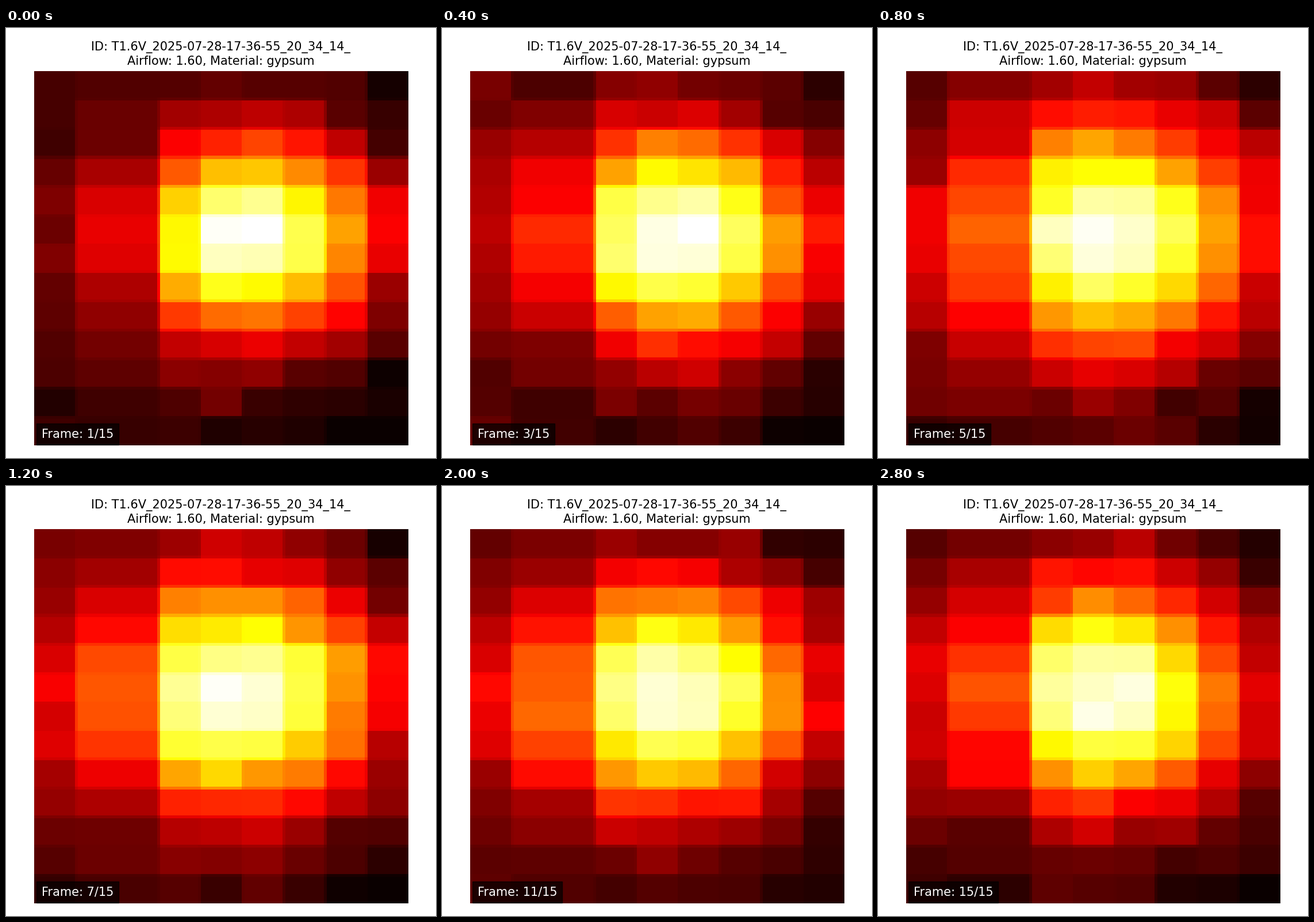
A matplotlib script that plays this animation: 748 px wide and 748 px high, repeating every 3 s.

```python
import numpy as np
import matplotlib.pyplot as plt
from matplotlib.animation import FuncAnimation

SIZE, DPI = 748, 100
FRAMES, STEP = 15, 200
ROWS, COLS, RES = 13, 9, 128
FLICKER = 0.025

plt.rcParams["font.family"] = "DejaVu Sans"
plt.rcParams["font.size"] = 15

noise = np.random.default_rng(7).normal(0, FLICKER, (FRAMES, ROWS, COLS))
row, col = np.mgrid[:ROWS, :COLS]


def area_weights(n):
    """Share of each of n cells in each of RES pixels."""
    p = np.arange(RES)[:, None] * n / RES
    c = np.arange(n)[None, :]
    overlap = np.minimum(p + n / RES, c + 1) - np.maximum(p, c)
    return np.clip(overlap, 0, None) * RES / n


row_weights, col_weights = area_weights(ROWS), area_weights(COLS)


def heat(i):
    """Warm spot that spreads quickly, settles and wanders to the left."""
    spread = np.interp(i, [0, 4, 7, 14], [0.88, 1.06, 1.02, 1.0])
    center = 4.3 + 0.5 * np.exp(-i / 3)
    dx = (col - center) / (2.6 * spread)
    dy = (row - 5.2) / (2.9 * spread)
    floor = 0.08 - 0.012 * col
    cells = floor + 0.97 * np.exp(-(dx**2 + dy**2) / 2) + noise[i]
    cells[:, 2] = cells[:, 1]  # one sensor column repeats its neighbour
    return row_weights @ np.clip(cells, 0, 1) @ col_weights.T


fig = plt.figure(figsize=(SIZE / DPI, SIZE / DPI), dpi=DPI, facecolor="white")
ax = fig.add_axes([48.8 / SIZE, 22.3 / SIZE, 650.4 / SIZE, 650.4 / SIZE])
ax.axis("off")
image = ax.imshow(heat(0), cmap="hot", vmin=0, vmax=1,
                  interpolation="nearest", aspect="auto")
ax.set_title("ID: T1.6V_2025-07-28-17-36-55_20_34_14_\n"
             "Airflow: 1.60, Material: gypsum", fontsize=15, pad=8.4)
label = ax.text(0.02, 0.02, "", transform=ax.transAxes, color="white",
                fontsize=15, bbox=dict(boxstyle="square,pad=0.4",
                                       facecolor="black", alpha=0.7))


def update(i):
    image.set_data(heat(i))
    label.set_text(f"Frame: {i + 1}/{FRAMES}")
    return image, label


anim = FuncAnimation(fig, update, frames=FRAMES, interval=STEP,
                     init_func=lambda: update(0), repeat=True, repeat_delay=0)
plt.show()
```
